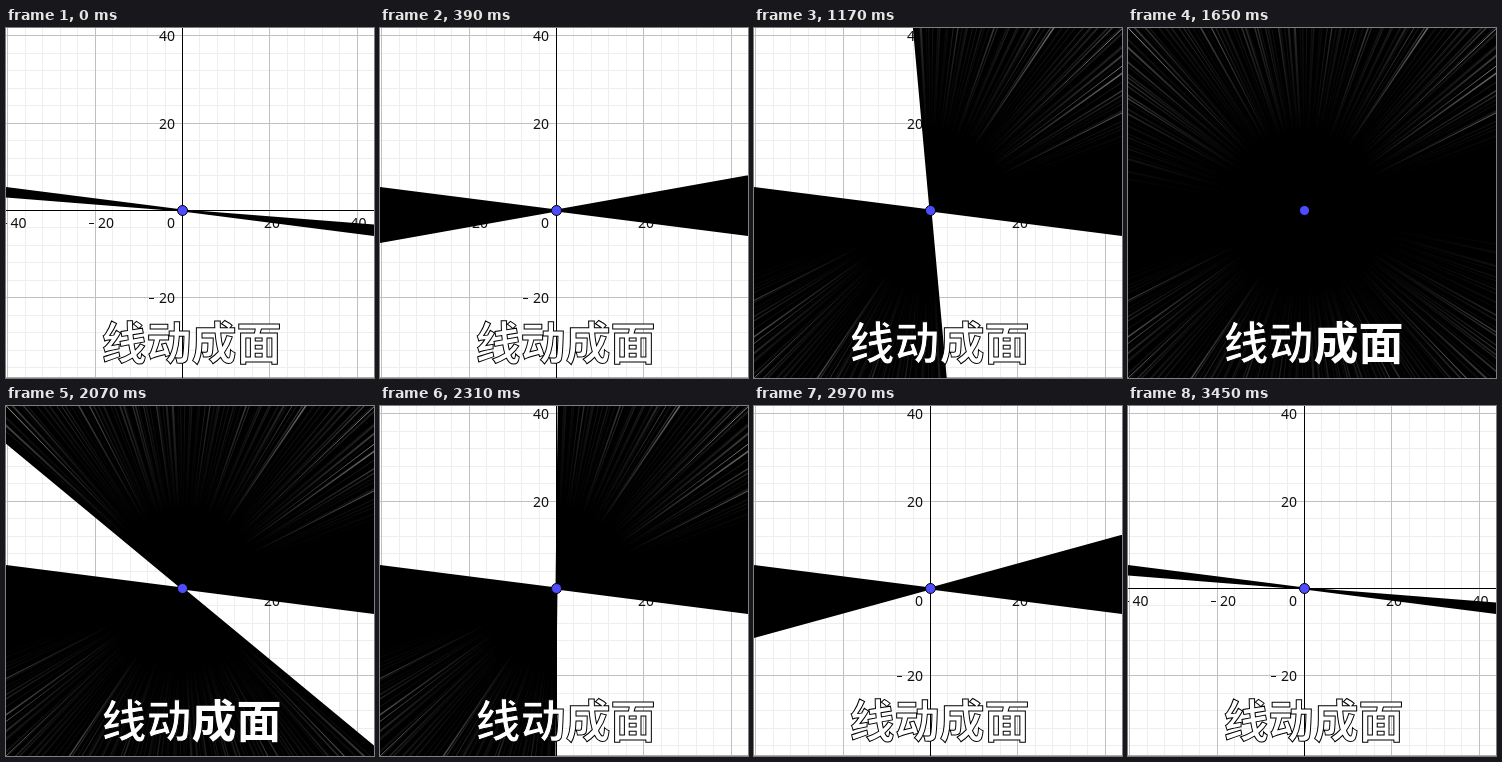
Recreate the animation shown at these times as an HTML page. Size 368x350 px, loop 3.48 s.

```html
<!DOCTYPE html>
<html lang="zh-CN">
<head>
<meta charset="utf-8">
<title>线动成面</title>
<style>
html, body { margin: 0; width: 100%; height: 100%; overflow: hidden; background: #fff; }
svg { display: block; width: 368px; height: 350px; }
.label { font: 14px "Noto Sans", "Open Sans", sans-serif; fill: #111; }
.title { font: 700 45px "Noto Sans CJK SC", "Noto Sans CJK", sans-serif; fill: #fff; stroke: #000; stroke-width: 1; }
</style>
</head>
<body>
<svg viewBox="0 0 368 350">
  <defs>
    <radialGradient id="glow" gradientUnits="userSpaceOnUse" cx="0" cy="0" r="270">
      <stop offset="0.28" stop-color="#999" stop-opacity="0"/>
      <stop offset="0.6" stop-color="#999" stop-opacity="0.45"/>
      <stop offset="1" stop-color="#ccc"/>
    </radialGradient>
  </defs>
  <rect width="368" height="350" fill="#fff"/>
  <g id="grid"></g>
  <g id="labels" class="label"></g>
  <g transform="translate(176.5 182.5)">
    <path id="fan" stroke="#000" stroke-width="2"/>
    <g id="streaks"></g>
    <circle r="5" fill="#4d4dff" stroke="#000"/>
  </g>
  <text class="title" x="95.5" y="331.5">线动<tspan id="tail">成面</tspan></text>
</svg>
<script>
const CX = 176.5, CY = 182.5, UNIT = 87.4, R = 420;
const STEP = 30, LAST = 55, HOLD = 6, LOOP = 3480;
const START = -7.3;
// [step, angle in degrees] of the turning line
const KEYS = [[0, -4.2], [13, 10.4], [18, 19.7], [19, 21.9], [30, 48.5],
              [39, 95.5], [46, 140.7], [54, 170.9], [55, 173]];

const $ = id => document.getElementById(id);

function add(parent, tag, attrs, text) {
  const el = document.createElementNS("http://www.w3.org/2000/svg", tag);
  for (const k in attrs) el.setAttribute(k, attrs[k]);
  if (text) el.textContent = text;
  parent.appendChild(el);
  return el;
}

function polar(r, deg) {
  const a = deg * Math.PI / 180;
  return [(r * Math.cos(a)).toFixed(2), (-r * Math.sin(a)).toFixed(2)];
}

function drawGrid() {
  const rule = (horizontal, pos, color) => {
    const p = Math.floor(pos) + 0.5;
    add($("grid"), "path", { d: horizontal ? `M0 ${p}H368` : `M${p} 0V350`, stroke: color });
  };
  for (const major of [false, true]) {
    for (let i = -10; i <= 10; i++) {
      if ((i % 5 === 0) !== major) continue;
      const color = major ? "#c0c0c0" : "#eee";
      rule(false, CX + i * UNIT / 5, color);
      rule(true, CY + i * UNIT / 5, color);
    }
  }
  rule(true, 349, "#aaa");
  rule(true, CY, "#000");
  rule(false, CX, "#000");
}

function drawLabels() {
  const put = (x, y, s) => add($("labels"), "text", { x, y }, s);
  const minus = (x, y) => add($("labels"), "rect", { x, y: y - 5, width: 5, height: 1 });
  put(4.5, 200, "40");
  minus(-4, 200);
  put(92, 200, "20");
  minus(83, 200);
  put(161, 200, "0");
  put(258, 200, "20");
  put(344.5, 200, "40");
  put(153, 13, "40");
  put(153, 101, "20");
  put(153, 275, "20");
  minus(143, 275);
}

let seed = 11;
function random() {
  seed = (seed * 16807) % 2147483647;
  return seed / 2147483647;
}

function makeStreaks() {
  const list = [];
  const ray = (angle, width, opacity) => {
    for (const side of [0, 180]) {
      const [x, y] = polar(R, angle + side);
      const el = add($("streaks"), "path", {
        d: `M0 0L${x} ${y}`, stroke: "url(#glow)", "stroke-width": width.toFixed(2),
        opacity: (side ? opacity * 0.8 : opacity).toFixed(2)
      });
      list.push({ el, angle });
    }
  };
  for (let i = 0; i < 125; i++) {
    const angle = 20 + 150 * (i + random()) / 125;
    const fade = Math.min(1, (angle - 14) / 20, (176 - angle) / 25);
    ray(angle, 0.6 + random() * 1.4, (0.1 + 0.5 * random() ** 2) * fade);
  }
  for (const angle of [27, 37, 43.5, 56, 117, 134]) ray(angle, 1, 0.75);
  return list;
}

// Smooth curve through the keys
const slope = i => (KEYS[i + 1][1] - KEYS[i][1]) / (KEYS[i + 1][0] - KEYS[i][0]);
const tangents = KEYS.map((k, i) => {
  if (i === 0 || i === KEYS.length - 1) return 0;
  const before = k[0] - KEYS[i - 1][0], after = KEYS[i + 1][0] - k[0];
  return (after * slope(i - 1) + before * slope(i)) / (before + after);
});
tangents[0] = (3 * slope(0) - tangents[1]) / 2;
tangents[KEYS.length - 1] = 1.5;

function angleAt(n) {
  let i = 0;
  while (i < KEYS.length - 2 && n >= KEYS[i + 1][0]) i++;
  const [n0, a0] = KEYS[i], [n1, a1] = KEYS[i + 1];
  const h = n1 - n0, u = (n - n0) / h, v = 1 - u;
  return a0 * v * v * (1 + 2 * u) + a1 * u * u * (1 + 2 * v)
    + h * u * v * (tangents[i] * v - tangents[i + 1] * u);
}

// One half of the swept area, as a sector around the centre
function sector(from, to) {
  return `M0 0L${polar(R, from).join(" ")}A${R} ${R} 0 0 0 ${polar(R, to).join(" ")}Z`;
}

drawGrid();
drawLabels();
const streaks = makeStreaks();

function render(ms) {
  const tick = Math.floor((ms % LOOP) / STEP);
  const n = tick <= LAST ? tick : Math.max(0, Math.min(LAST, 2 * LAST + HOLD - 1 - tick));
  const angle = angleAt(n), end = angle - 0.3;
  $("fan").setAttribute("d", sector(START, end) + sector(START + 180, end + 180));
  for (const s of streaks) s.el.style.display = s.angle < end - 0.5 ? "" : "none";
  $("tail").style.stroke = angle > 131 ? "none" : "";
}

let begin;
function frame(now) {
  if (begin === undefined) begin = now;
  render(now - begin);
  requestAnimationFrame(frame);
}
render(0);
requestAnimationFrame(frame);
</script>
</body>
</html>
```
